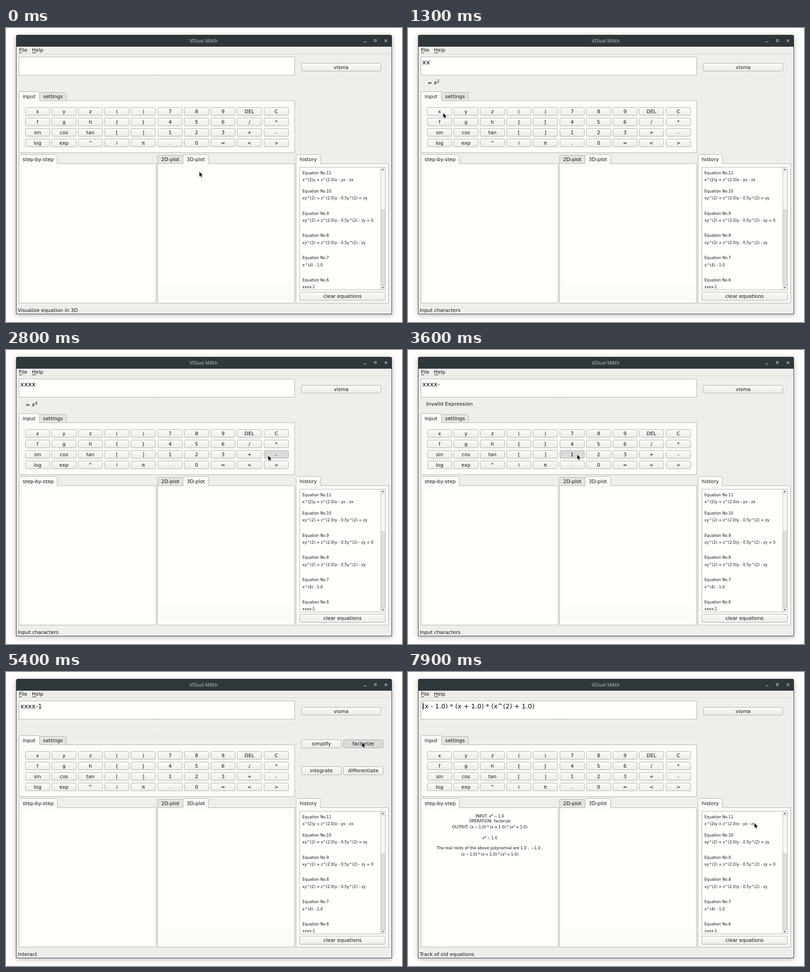
Recreate the animation shown at these times as an HTML page with a canvas. Size 869 by 645 pixels, loop 8 s.

```html
<!DOCTYPE html>
<html lang="en">
<head>
<meta charset="utf-8">
<title>VISual MAth</title>
<style>
html, body { margin: 0; width: 100%; height: 100%; overflow: hidden; background: #fefefc; }
canvas { display: block; }
</style>
</head>
<body>
<canvas id="stage" width="869" height="645"></canvas>
<script>
const ctx = document.getElementById('stage').getContext('2d');
const LOOP = 8000, STEP = 100;
const SANS = '"DejaVu Sans", sans-serif';
const C = {
  page: '#fefefc', win: '#eeefeb', panel: '#fbfcf8', field: '#fffffc',
  line: '#b0b1ad', ink: '#111', title: '#2f373a', dim: '#e3e4e0'
};

// Timelines: [start, value]
const typed = [[0, ''], [1000, 'x'], [1300, 'xx'], [1500, 'xxx'], [1800, 'xxxx'],
  [2900, 'xxxx-'], [3700, 'xxxx-1'], [5500, '(x - 1.0) * (x + 1.0) * (x^(2) + 1.0)']];
const preview = [[0, ''], [1000, '= {x}'], [1300, '= {x}^2'], [1500, '= {x}^3'], [1800, '= {x}^4'],
  [2900, 'Invalid Expression'], [3700, '= {x}^4~−~1.0'], [4600, '']];
const status = [[0, 'Visualize equation in 3D'], [600, 'Input characters'],
  [4200, 'Interact'], [7900, 'Track of old equations']];
const pressed = [[0, ''], [900, 'x'], [1000, ''], [1100, 'x'], [1300, ''], [1400, 'x'], [1500, ''],
  [1700, 'x'], [1800, ''], [2800, '-'], [2900, ''], [3600, '1'], [3700, ''], [5400, 'factorize'], [5500, '']];
const caret = [[0, false], [5500, true], [6300, false], [6700, true], [7300, false], [7600, true]];

// Pointer keys: [time, x, y]
const path = [[0, 424, 315], [300, 424, 315], [800, 77, 186], [1900, 77, 186], [2500, 583, 246],
  [2600, 575, 231], [2900, 575, 231], [3500, 371, 229], [3700, 371, 229], [4300, 711, 84],
  [4400, 711, 84], [4500, 710, 94], [4700, 710, 94], [5100, 795, 153], [5200, 781, 154],
  [7700, 781, 154], [7800, 774, 235], [7900, 760, 331], [8000, 760, 331]];

const keys = [
  ['x', 'y', 'z', '(', ')', '7', '8', '9', 'DEL', 'C'],
  ['f', 'g', 'h', '{', '}', '4', '5', '6', '/', '*'],
  ['sin', 'cos', 'tan', '[', ']', '1', '2', '3', '+', '-'],
  ['log', 'exp', '^', 'i', 'π', '.', '0', '=', '<', '>']
];
const history = [
  [320.5, 'Equation No.11', 'x^(2)y + z^(2.0)x - yx - zx'],
  [360.5, 'Equation No.10', 'xy^(2) + z^(2.0)y - 0.5y^(2) = zy'],
  [409.5, 'Equation No.9', 'xy^(2) + z^(2.0)y - 0.5y^(2) - zy = 0'],
  [458.2, 'Equation No.8', 'xy^(2) + z^(2.0)y - 0.5y^(2) - zy'],
  [507, 'Equation No.7', 'x^(4) - 1.0'],
  [555.7, 'Equation No.6', 'xxxx-1']
];
const factors = '({x}~−~1.0)~*~({x}~+~1.0)~*~({x}^2~+~1.0)';
const steps = [
  [319.3, 'INPUT: {x}^4~−~1.0'],
  [330.3, 'OPERATION: factorize'],
  [343.2, 'OUTPUT: ' + factors],
  [367, '{x}^4~−~1.0'],
  [389.2, 'The real roots of the above polynomial are 1.0 , ~−1.0 ,'],
  [403.2, factors]
];

const at = (list, t) => list.filter(e => e[0] <= t).pop()[1];

function pointerAt(t) {
  const i = Math.max(1, path.findIndex(k => k[0] > t));
  const [t0, x0, y0] = path[i - 1], [t1, x1, y1] = path[i];
  const u = (t - t0) / (t1 - t0), e = u * u * (3 - 2 * u);
  return { x: x0 + (x1 - x0) * e, y: y0 + (y1 - y0) * e };
}

function rect(x, y, w, h, fill) {
  ctx.fillStyle = fill;
  ctx.fillRect(x, y, w, h);
}

function frame(x, y, w, h, fill, stroke = C.line, r = 0) {
  ctx.beginPath();
  ctx.roundRect(x + .5, y + .5, w - 1, h - 1, r);
  ctx.fillStyle = fill;
  ctx.fill();
  ctx.strokeStyle = stroke;
  ctx.lineWidth = 1;
  ctx.stroke();
}

function line(points, color, width = 1) {
  ctx.beginPath();
  points.forEach(([x, y]) => ctx.lineTo(x, y));
  ctx.strokeStyle = color;
  ctx.lineWidth = width;
  ctx.stroke();
}

function poly(points, color) {
  ctx.beginPath();
  points.forEach(([x, y]) => ctx.lineTo(x, y));
  ctx.closePath();
  ctx.fillStyle = color;
  ctx.fill();
}

function text(s, x, y, size = 10.9, align = 'left') {
  ctx.font = `${size}px ${SANS}`;
  ctx.textAlign = align;
  ctx.fillStyle = C.ink;
  ctx.fillText(s, x, y);
}

// Markup: {x} italic, ^n superscript, ~ thin space. Returns the width.
function math(src, x, y, size, draw = true) {
  const x0 = x;
  for (const part of src.match(/\{\w\}|\^\d|~|[^{^~]+/g) || []) {
    if (part === '~') { x += size * .2; continue; }
    const sup = part[0] === '^', italic = part[0] === '{';
    const s = sup ? part[1] : italic ? part[1] : part;
    ctx.font = `${italic ? 'italic ' : ''}${sup ? size * .7 : size}px ${SANS}`;
    ctx.textAlign = 'left';
    ctx.fillStyle = C.ink;
    if (draw) ctx.fillText(s, x, sup ? y - size * .33 : y);
    x += ctx.measureText(s).width;
  }
  return x - x0;
}

function button(x, y, w, label, state, h = 18) {
  const p = state.pointer;
  const over = p.x >= x && p.x < x + w && p.y >= y && p.y < y + h;
  let fill = '#dadad8';
  if (state.pressed !== label) {
    fill = ctx.createLinearGradient(0, y, 0, y + h);
    fill.addColorStop(0, over ? '#fffffd' : '#fbfcf8');
    fill.addColorStop(1, over ? '#f4f5f1' : '#ebece8');
  }
  frame(x, y, w, h, fill, '#abaca8', 2);
  text(label, x + w / 2, y + 13, 10.9, 'center');
}

function tab(x, w, base, label, active, pad = 8.5) {
  const y = base - (active ? 20 : 18);
  ctx.save();
  ctx.beginPath();
  ctx.rect(x, y, w, base - y + (active ? 1 : 0));
  ctx.clip();
  frame(x, y, w, 30, active ? C.panel : '#e4e5e1', C.line, 2);
  ctx.restore();
  text(label, x + pad, base - 5);
}

function windowFrame() {
  rect(0, 0, 869, 645, C.page);
  ctx.save();
  ctx.shadowColor = 'rgba(0,0,0,.28)';
  ctx.shadowBlur = 11;
  ctx.shadowOffsetY = 2;
  ctx.beginPath();
  ctx.roundRect(22, 15, 825, 613, [4, 4, 0, 0]);
  ctx.fillStyle = C.title;
  ctx.fill();
  ctx.restore();
  rect(23, 41, 823, 586, C.win);
  ctx.font = 'bold 10px "Noto Sans", "Open Sans", sans-serif';
  ctx.textAlign = 'center';
  ctx.fillStyle = '#8b9294';
  ctx.fillText('VISual MAth', 433.5, 32);
  const icon = '#b4b9ba';
  line([[785, 30.5], [791, 30.5]], icon, 1.3);
  ctx.strokeRect(808.5, 25.5, 4, 4);
  line([[831, 25.3], [836.2, 30.5]], icon, 1.4);
  line([[836.2, 25.3], [831, 30.5]], icon, 1.4);

  text('File', 28.5, 52);
  text('Help', 57, 52);
  rect(29, 54, 6, 1, C.ink);
  rect(58, 54, 8, 1, C.ink);
  rect(23, 56, 823, 1, '#d9dad6');
  for (const [x, y, w, h] of [[328, 104, 10, 1], [328, 137, 10, 1], [735, 103, 9, 1], [830, 81, 1, 9]])
    rect(x, y, w, h, C.dim);
}

function inputArea(t, state) {
  frame(28, 63, 606, 41, C.field);
  text(at(typed, t), 31.3, 80, 14.2);
  if (at(caret, t)) rect(32, 66, 1, 17, C.ink);

  const note = at(preview, t);
  if (note[0] === '=') math(note, 42.7, 124, 12);
  else text(note, 40, 121.5, 11.25);

  button(648, 77, 175, 'visma', state);
  if (t >= 4600 && t < 5500) {
    button(648, 148, 88, 'simplify', state, 19);
    button(740, 148, 88, 'factorize', state, 19);
    button(648, 207, 88, 'integrate', state, 19);
    button(740, 207, 88, 'differentiate', state, 19);
  }

  frame(28, 159, 606, 115, C.panel);
  tab(28, 46, 159, 'input', true);
  tab(73, 60, 159, 'settings', false);
  keys.forEach((row, r) => row.forEach((k, c) =>
    button(Math.round(41.6 + c * 58.22), 174 + r * 23, 54.5, k, state)));
}

function lowerArea(t, state) {
  frame(28, 297, 302, 307, C.panel);
  tab(28, 85, 297, 'step-by-step', true);
  rect(36, 305, 287, 293, C.field);
  if (t >= 5500)
    for (const [y, s] of steps) math(s, 179.5 - math(s, 0, 0, 8.5, false) / 2, y, 8.5);

  frame(332, 297, 302, 307, C.panel);
  tab(332, 57, 297, '2D-plot', false);
  tab(388, 57, 297, '3D-plot', true);
  rect(340, 305, 288, 256, C.field);

  frame(636, 297, 204, 307, C.panel);
  tab(636, 54, 297, 'history', true);
  frame(644, 305, 189, 270, C.field);
  ctx.save();
  ctx.beginPath();
  ctx.rect(645, 306, 178, 268);
  ctx.clip();
  for (const [y, name, eq] of history) {
    text(name, 650.5, y, 8.25);
    text(eq, 650.5, y + 15.7, 8.25);
  }
  ctx.restore();

  rect(822, 306, 10, 268, '#f4f5f1');
  rect(823, 315, 9, 250, '#dededb');
  rect(823, 315, 9, 84, '#f6f7f3');
  for (const y of [314, 398, 565]) rect(823, y, 9, 1, '#c3c4c0');
  rect(822, 306, 1, 268, '#bcbdb9');
  poly([[824.5, 311.5], [829.5, 311.5], [827, 308.5]], '#444');
  poly([[824.5, 568.5], [829.5, 568.5], [827, 571.5]], '#444');
  button(644, 579, 189, 'clear equations', state, 19);
  text(at(status, t), 25.8, 623);
}

function pointer({ x, y }) {
  const shape = [[0, 0], [0, 10.4], [2.4, 8.3], [4.1, 12], [5.7, 11.3], [4, 7.7], [7.2, 7.4]];
  ctx.save();
  ctx.translate(x + .4, y + .6);
  ctx.lineJoin = 'round';
  line([...shape, shape[0]], 'rgba(255,255,255,.85)', 1.6);
  poly(shape, '#0a0a0a');
  ctx.restore();
}

function draw(now) {
  const t = Math.floor((now % LOOP) / STEP) * STEP;
  const state = { pointer: pointerAt(t), pressed: at(pressed, t) };
  windowFrame();
  inputArea(t, state);
  lowerArea(t, state);
  pointer(state.pointer);
}

const start = performance.now();
function tick() {
  draw(performance.now() - start);
  requestAnimationFrame(tick);
}
tick();
</script>
</body>
</html>
```
